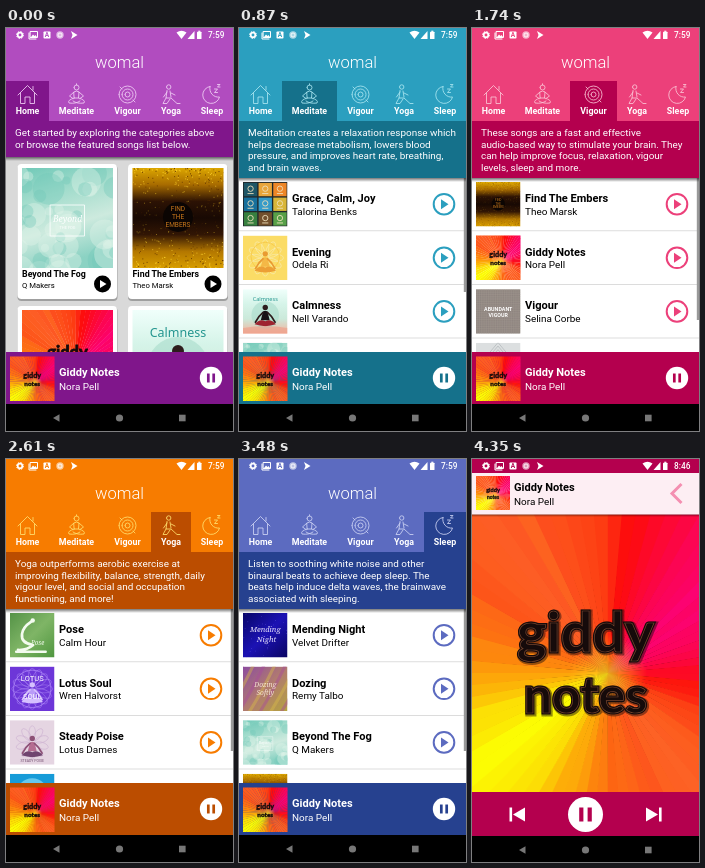
Animation of 227x403 px, one loop 5.22 s. Source, as an HTML page:

```html
<!DOCTYPE html>
<html lang="en">
<meta charset="utf-8">
<title>Music player</title>
<style>
  html, body { margin: 0; width: 100%; height: 100%; overflow: hidden; background: #000; }
  #stage { display: block; width: 227px; height: 403px; }
  text { font-family: Roboto, sans-serif; }
  .line { fill: none; stroke-linecap: round; stroke-linejoin: round; }
  .mid { text-anchor: middle; }
  .logo { font-family: Lato, sans-serif; font-weight: 700; stroke: #160b0b; text-anchor: middle; }
  .script { font-family: "Noto Serif", serif; font-style: italic; text-anchor: middle; }
</style>
<svg id="stage" viewBox="0 0 227 403"></svg>
<script>
const STEP = 870;
const stage = document.getElementById('stage');

let seed = 7;
const random = () => (seed = seed * 16807 % 2147483647) / 2147483647;
const repeat = (n, make) => Array.from({ length: n }, (_, i) => make(i)).join('');

const rect = (x, y, w, h, fill, more = '') => `<rect x="${x}" y="${y}" width="${w}" height="${h}" fill="${fill}" ${more}/>`;
const disc = (x, y, r, fill, more = '') => `<circle cx="${x}" cy="${y}" r="${r}" fill="${fill}" ${more}/>`;
const ring = (x, y, r, stroke, width) => disc(x, y, r, 'none', `stroke="${stroke}" stroke-width="${width}"`);
const shape = (d, fill, more = '') => `<path d="${d}" fill="${fill}" ${more}/>`;
const line = (d, stroke, width, more = '') => `<path class="line" d="${d}" stroke="${stroke}" stroke-width="${width}" ${more}/>`;
const text = (s, x, y, size, fill, more = '') => `<text x="${x}" y="${y}" font-size="${size}" fill="${fill}" ${more}>${s}</text>`;
const mid = (s, x, y, size, fill, more = '') => text(s, x, y, size, fill, 'class="mid" ' + more);
const bold = (s, x, y, size, fill) => text(s, x, y, size, fill, 'font-weight="700"');
const cover = (name, x, y, w, h = w) => `<use href="#${name}" x="${x}" y="${y}" width="${w}" height="${h}"/>`;

// Rays run from magenta (upper right) through orange to yellow (lower left).
const rays = repeat(72, i => {
  const a = i * 5 * Math.PI / 180, b = a + 5.4 * Math.PI / 180;
  const t = Math.cos(a + 0.68);
  const hue = 16 - 42 * t ** 3 + 5 * (random() - 0.5);
  const at = q => `${(58 + 120 * Math.cos(q)).toFixed(1)} ${(57 + 120 * Math.sin(q)).toFixed(1)}`;
  return shape(`M58 57L${at(a)}L${at(b)}Z`, `hsl(${hue.toFixed(1)} 98% ${(57 - 7 * Math.abs(t)).toFixed(1)}%)`);
}) + disc(58, 57, 14, 'url(#glow)');

const sitter = (skin, top, legs) =>
  disc(50, 41, 6, skin) +
  shape('M45 50Q50 47 55 50L60 70H40Z', top) +
  line('M45 52Q35 60 28 74M55 52Q65 60 72 74', skin, 4) +
  shape('M26 79Q38 65 50 72Q62 65 74 79Q50 87 26 79Z', legs);

const petals = (n, r, color, width) => repeat(n, i =>
  `<ellipse cx="50" cy="${50 - r}" rx="${r / 3}" ry="${r * 0.7}" fill="none" stroke="${color}" stroke-width="${width}" transform="rotate(${i * 360 / n} 50 50)"/>`);

const gridColors = ['#1f5666', '#e9a53b', '#ee8627', '#176f9c', '#369bc9', '#d9b63a', '#37803f', '#72502c', '#58a048'];

const art = {
  rays,
  tune: rays +
    text('giddy', 50, 48, 16.5, '#160b0b', 'class="logo" stroke-width=".8"') +
    text('notes', 50, 67, 14.5, '#160b0b', 'class="logo" stroke-width=".8"'),
  clouds: rect(0, 0, 100, 100, 'url(#sky)') +
    repeat(46, () => {
      const y = random() * 105;
      return disc(random() * 100, y, 4 + random() * 12, random() < 0.3 + y / 200 ? '#e2f4ea' : '#72c9b7', 'opacity=".38"');
    }) +
    line('M33 37H67V68H33Z', '#fff', 0.8) +
    text('Beyond', 50, 54, 8.5, '#fff', 'class="script"') +
    mid('THE FOG', 50, 61, 4, '#fff'),
  gold: rect(0, 0, 100, 100, 'url(#gilt)') +
    repeat(480, () => {
      const edge = random() ** 1.6 * 48, y = random() < 0.5 ? edge : 100 - edge;
      return rect((random() * 100).toFixed(1), y.toFixed(1), 1, 1, random() < 0.6 ? '#ffd52e' : '#5c3000', `opacity="${(0.9 - edge / 70).toFixed(2)}"`);
    }) +
    disc(50, 49, 15, '#0b0503') +
    ['FIND', 'THE', 'EMBERS'].map((s, i) => mid(s, 50, 43 + i * 8, 6.5, '#c9781c')).join(''),
  calm: rect(0, 0, 100, 100, 'url(#mint)') +
    disc(50, 58, 31, '#a9dccb', 'opacity=".6"') +
    mid('Calmness', 50, 27, 12.5, '#23958f', 'style="font-family:Noto Sans,sans-serif"') +
    sitter('#2d1c1c', '#171316', '#9e2430') +
    shape('M0 87Q50 78 100 87V100H0Z', '#ef9c86', 'opacity=".6"'),
  grid: rect(0, 0, 100, 100, '#20272a') +
    gridColors.map((c, i) => {
      const x = 2 + i % 3 * 33, y = 2 + Math.floor(i / 3) * 33;
      return rect(x, y, 30, 30, c) + ring(x + 15, y + 13, 6, '#eee0bb', 2) + line(`M${x + 9} ${y + 24}h12`, '#eee0bb', 2);
    }).join(''),
  evening: rect(0, 0, 100, 100, '#fbdc66') + petals(12, 24, '#f8ebb0', 1.5) + ring(50, 47, 32, '#f6c94a', 2) +
    sitter('#e99b32', '#f4b846', '#ec9f35'),
  vigour: rect(0, 0, 100, 100, '#8d837e') +
    repeat(25, i => line(`M0 ${i * 4}h100M${i * 4} 0v100`, '#a49b95', 0.8)) +
    mid('ABUNDANT', 50, 49, 12, '#fff', 'font-weight="700"') +
    mid('VIGOUR', 50, 62, 12, '#fff', 'font-weight="700"'),
  facets: rect(0, 0, 100, 100, '#dcdfe0') + repeat(6, i => line(`M50 ${i * 8}L${100 - i * 6} 60H${i * 6}Z`, '#aeb4b7', 1.5)),
  pose: rect(0, 0, 100, 100, 'url(#leaf)') +
    line('M14 87H80M18 83Q38 84 52 72Q24 68 27 47Q29 32 47 20', '#f3fbef', 6) + disc(51, 17, 5, '#f3fbef') +
    text('Pose', 62, 72, 14, '#f3fbef', 'class="script"'),
  lotus: rect(0, 0, 100, 100, '#6d36d8') + petals(16, 27, '#a77ff2', 1.2) + ring(50, 50, 42, '#b894ff', 1.5) +
    mid('LOTUS', 50, 33, 17, '#fff') + sitter('#d5c0ff', '#b99cf8', '#d5c0ff') + mid('SOUL', 50, 72, 17, '#fff'),
  poise: rect(0, 0, 100, 100, '#e5d5e2') + petals(10, 22, '#cbaed0', 1.2) + sitter('#8d5176', '#b56d91', '#70446f') +
    mid('STEADY POISE', 50, 95, 8, '#755071'),
  azure: rect(0, 0, 100, 100, '#169bd8') + disc(50, 45, 35, '#65c8ed') + sitter('#fff', '#fff', '#fff'),
  night: rect(0, 0, 100, 100, 'url(#dusk)') +
    repeat(30, () => disc(random() * 100, random() * 100, 0.7, '#7770f4')) +
    text('Mending', 50, 43, 17, '#eee9ff', 'class="script"') + text('Night', 53, 66, 17, '#eee9ff', 'class="script"'),
  dozing: rect(0, 0, 100, 100, 'url(#haze)') +
    repeat(9, i => line(`M${i * 24 - 60} 105Q${i * 24 - 28} 55 ${i * 24} -5`, i % 2 ? '#d6b94b' : '#a64b9b', 7, 'opacity=".45"')) +
    text('Dozing', 50, 46, 15, '#f8e9d5', 'class="script"') + text('Softly', 50, 64, 15, '#f8e9d5', 'class="script"'),
};

const gradient = (id, colors, slant = 0) => `<linearGradient id="${id}" x2="${slant}" y2="1">` +
  colors.map((c, i) => `<stop offset="${i / (colors.length - 1)}" stop-color="${c}"/>`).join('') + '</linearGradient>';

const defs = '<defs>' +
  gradient('sky', ['#6ec8b7', '#a2dccc', '#cdeade', '#8bd2c3'], 0.3) +
  gradient('gilt', ['#dca600', '#a86c00', '#2c1204', '#180903', '#321604', '#b37700', '#d79d00']) +
  gradient('mint', ['#f0fffb', '#d6f4e9', '#cbe9da', '#f5b39d']) +
  gradient('leaf', ['#559347', '#7fb566', '#4f963f'], 1) +
  gradient('dusk', ['#080668', '#1c12b4', '#0a0562'], 1) +
  gradient('haze', ['#8c4c9f', '#b07a70', '#b5a43f'], 1) +
  gradient('shade', ['#0008', '#0000']) +
  '<radialGradient id="glow"><stop stop-color="#ffd520" stop-opacity=".75"/><stop offset="1" stop-color="#ffd520" stop-opacity="0"/></radialGradient>' +
  Object.entries(art).map(([id, body]) =>
    `<symbol id="${id}" viewBox="0 0 100 100" preserveAspectRatio="xMidYMid slice">${body}</symbol>`).join('') + '</defs>';

function statusBar(time, back) {
  return ring(14, 7, 2.3, '#fff', 1.7) + `<circle cx="14" cy="7" r="3.5" fill="none" stroke="#fff" stroke-dasharray="1.4 1.35"/>` +
    line('M24.5 3.5H31.5V9.5H24.5ZM23 5V11H30', '#fff', 1) + shape('M25 9L27 6.5L28.5 8L29.5 7L31 9Z', '#fff') +
    rect(37.5, 3.5, 7, 7, '#fff', 'rx=".8"') + mid('A', 41, 9.3, 6.5, back, 'font-weight="700"') +
    disc(54, 7, 3.7, '#fff', 'opacity=".6"') + ring(54, 7, 2, '#fff', 0.8) +
    shape('M65 3L71.5 7L65 11L66.5 7Z', '#fff') +
    shape('M170.5 4.5Q175.5 1 180.5 4.5L175.5 11Z', '#fff') +
    shape('M188.5 3V11H181.5Z', '#fff') +
    rect(191, 3.7, 4.5, 7.3, '#fff', 'rx=".6"') + rect(192.3, 2.7, 2, 1.2, '#fff') +
    text(time, 202, 10, 8.3, '#fff', 'font-weight="500"');
}

function navBar(top) {
  const y = top + 14;
  return rect(0, top, 227, 403 - top, '#000') +
    shape(`M53.5 ${y - 3.7}V${y + 3.7}L47 ${y}Z`, '#777') + disc(113.5, y, 3.6, '#777') + rect(173, y - 3.3, 6.6, 6.6, '#777');
}

const pause = (x, y, r, color) => disc(x, y, r, '#fff') +
  rect(x - r * 0.36, y - r * 0.4, r * 0.24, r * 0.8, color) + rect(x + r * 0.12, y - r * 0.4, r * 0.24, r * 0.8, color);

const tabs = [
  { name: 'Home', x: 0, w: 43, icon: 'M12 67L21.5 57.5L31 67M14.5 65V75.5H19V69H24V75.5H28.5V65M27 62V58.5' },
  { name: 'Meditate', x: 43, w: 55, icon: 'M68 59.5a2.5 2.5 0 1 0 5 0a2.5 2.5 0 1 0 -5 0M70.5 57V55.8M68 64Q70.5 62 73 64L72.5 70H68.5ZM68 64L63.5 68L67 70.5M73 64L77.5 68L74 70.5M68.5 70Q61 72 63 75Q70 76 74 73M72.5 70Q80 72 78 75Q71 76 67 73' },
  { name: 'Vigour', x: 98, w: 47, icon: 'M113 66.5a8.5 8.5 0 1 0 17 0a8.5 8.5 0 1 0 -17 0M116 66.5a5.5 5.5 0 1 0 11 0a5.5 5.5 0 1 0 -11 0M119 66.5a2.5 2.5 0 1 0 5 0a2.5 2.5 0 1 0 -5 0M114 59L116 61M127 72L129 74' },
  { name: 'Yoga', x: 145, w: 40, icon: 'M160.5 59a2.2 2.2 0 1 0 4.4 0a2.2 2.2 0 1 0 -4.4 0M161 62.5L160 70H165L171 75.5H174M164 63L165 69M161 64L157.5 69M160 70L157 75.5H161L164 71M165 65L169 67' },
  { name: 'Sleep', x: 185, w: 42, icon: 'M204 58.5A8.5 8.5 0 1 0 213.5 69A8.5 8.5 0 0 1 204 58.5M208.5 61H211.5L208.5 64.5H211.5M211.5 56.5H214L211.5 59H214' },
];

const pages = [
  { main: '#b14cbf', dark: '#80168b', tint: '#f0cff5',
    about: ['Get started by exploring the categories above', 'or browse the featured songs list below.'] },
  { main: '#2b9fbf', dark: '#15718b', tint: '#a9e6f0', bar: 114,
    about: ['Meditation creates a relaxation response which', 'helps decrease metabolism, lowers blood', 'pressure, and improves heart rate, breathing,', 'and brain waves.'],
    songs: [['grid', 'Grace, Calm, Joy', 'Talorina Benks'], ['evening', 'Evening', 'Odela Ri'], ['calm', 'Calmness', 'Nell Varando'], ['clouds']] },
  { main: '#ec407a', dark: '#b4004e', tint: '#fbc3d4', bar: 142,
    about: ['These songs are a fast and effective', 'audio-based way to stimulate your brain. They', 'can help improve focus, relaxation, vigour', 'levels, sleep and more.'],
    songs: [['gold', 'Find The Embers', 'Theo Marsk'], ['tune', 'Giddy Notes', 'Nora Pell'], ['vigour', 'Vigour', 'Selina Corbe'], ['facets']] },
  { main: '#f77c00', dark: '#bb4d00', tint: '#ffe06e', bar: 142,
    about: ['Yoga outperforms aerobic exercise at', 'improving flexibility, balance, strength, daily', 'vigour level, and social and occupation', 'functioning, and more!'],
    songs: [['pose', 'Pose', 'Calm Hour'], ['lotus', 'Lotus Soul', 'Wren Halvorst'], ['poise', 'Steady Poise', 'Lotus Dames'], ['azure']] },
  { main: '#5c6bc0', dark: '#26418f', tint: '#cdd3f4', bar: 142,
    about: ['Listen to soothing white noise and other', 'binaural beats to achieve deep sleep. The', 'beats help induce delta waves, the brainwave', 'associated with sleeping.'],
    songs: [['night', 'Mending Night', 'Velvet Drifter'], ['dozing', 'Dozing', 'Remy Talbo'], ['clouds', 'Beyond The Fog', 'Q Makers'], ['gold']] },
];

function card([name, title, artist], x, y) {
  return rect(x, y + 1, 100, 136, '#0004', 'rx="4"') + rect(x, y, 99.5, 135, '#fff', 'rx="4"') +
    cover(name, x + 4.5, y + 4, 91, 100) +
    bold(title, x + 4.5, y + 113, 8.84, '#000') + text(artist, x + 4.5, y + 124, 7.73, '#000') +
    disc(x + 85, y + 120, 8.5, '#000') + shape(`M${x + 82.5} ${y + 116}l6.5 4l-6.5 4Z`, '#fff');
}

function songRow([name, title, artist], i, color) {
  const y = 154 + i * 53.6;
  if (!title) return cover(name, 4, y, 44.5);
  return cover(name, 4, y, 44.5) + bold(title, 53, y + 20, 11.05, '#000') + text(artist, 53, y + 32.7, 9.94, '#000') +
    ring(205, y + 22.2, 10.3, color, 2) + shape(`M202 ${y + 17.2}l7.5 5l-7.5 5Z`, color) +
    rect(0, y + 48.4, 227, 0.8, '#d4d4d4');
}

function listPage({ main, dark, tint, about, songs, bar }, active) {
  const bottom = songs ? 150 : 129;
  const content = songs
    ? songs.map((song, i) => songRow(song, i, main)).join('') + rect(224.8, 150, 2.2, bar, '#999')
    : card(['clouds', 'Beyond The Fog', 'Q Makers'], 11.5, 136) + card(['gold', 'Find The Embers', 'Theo Marsk'], 122, 136) +
      card(['tune', '', ''], 11.5, 278) + card(['calm', '', ''], 122, 278);
  return rect(0, 0, 227, 403, songs ? '#fff' : '#d9d9d9') + content +
    rect(0, bottom, 227, 4, 'url(#shade)') +
    rect(0, 0, 227, 94, main) + rect(0, 93, 227, bottom - 93, dark) +
    statusBar('7:59', main) +
    mid('womal', 113.5, 40, 16.57, '#fff', 'font-weight="300"') +
    tabs.map(({ name, x, w, icon }, i) =>
      (i === active ? rect(x, 53, w, 41, dark) : '') + line(icon, tint, 0.85) +
      mid(name, x + w / 2, 86, 8.84, '#fff', 'font-weight="700"')).join('') +
    about.map((s, i) => text(s, 9, 107.6 + i * 11.9, 9.94, '#fff')).join('') +
    rect(0, 324, 227, 53, dark) + cover('tune', 4, 328.5, 44.5) +
    bold('Giddy Notes', 53, 348, 11.05, '#fff') + text('Nora Pell', 53, 361.5, 9.94, '#fff') +
    pause(205, 350, 11.2, dark) + navBar(376);
}

function playerPage() {
  const dark = '#b4004e';
  const logo = (s, y, size) =>
    text(s, 114.5, y + 1, size, '#5a2a1a', 'class="logo" stroke-width="5" opacity=".45"') +
    text(s, 113.5, y, size, '#160b0b', 'class="logo" stroke-width="3"') +
    text(s, 113.5, y, size, 'none', 'class="logo" style="stroke:#75452f" stroke-width=".7"');
  return cover('rays', 0, 55, 227, 279) + logo('giddy', 193, 56) + logo('notes', 254, 50) +
    rect(0, 55, 227, 3, 'url(#shade)') + rect(0, 0, 227, 15, dark) + statusBar('8:46', dark) +
    rect(0, 14, 227, 41.5, '#fdeef3') + cover('tune', 4, 17, 34) +
    bold('Giddy Notes', 42, 32, 11.05, '#000') + text('Nora Pell', 42, 45.5, 9.94, '#000') +
    `<path d="M209.5 25L200 34.5L209.5 44" fill="none" stroke="#f48fb1" stroke-width="3"/>` +
    rect(0, 333, 227, 45, dark) +
    rect(37.5, 348.5, 2.6, 14, '#fff') + shape('M53 348.5V362.5L41 355.5Z', '#fff') +
    pause(113.5, 355.5, 17.5, dark) +
    shape('M174 348.5V362.5L186 355.5Z', '#fff') + rect(187, 348.5, 2.6, 14, '#fff') + navBar(377);
}

const screens = [...pages.map(listPage), playerPage()];
stage.innerHTML = defs + screens.map(body => `<g class="screen" display="none">${body}</g>`).join('');
const groups = [...stage.querySelectorAll('.screen')];

function draw(now) {
  const current = Math.floor(now / STEP) % groups.length;
  groups.forEach((g, i) => g.setAttribute('display', i === current ? 'inline' : 'none'));
  requestAnimationFrame(draw);
}
draw(performance.now());
</script>
</html>
```
